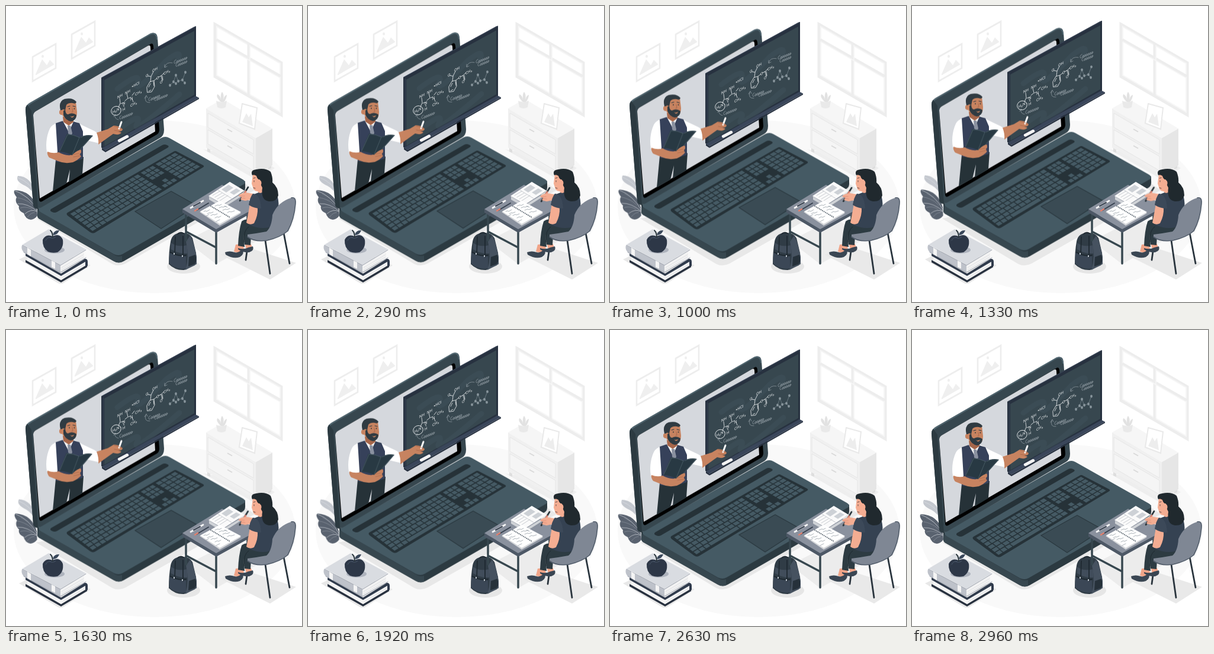
Write an HTML page that moves like this. It is 500 px wide and 500 px high and loops after 3000 ms.

```html
<!DOCTYPE html>
<html lang="en">
<head>
<meta charset="utf-8">
<title>Online chemistry lesson</title>
<style>
html,body{margin:0;width:100%;height:100%;overflow:hidden;background:#fff}
svg{display:block;width:100vw;height:100vh}
.line{fill:none;stroke-linecap:round;stroke-linejoin:round}
.float{animation:float 3s ease-in-out infinite}
.board{animation:lift 3s ease-in-out infinite}
.book{transform-origin:110px 250px;animation:tilt 3s ease-in-out infinite}
.leaf{transform-origin:50px 340px;animation:sway 3s ease-in-out infinite}
.write{animation:write .75s ease-in-out infinite}
@keyframes float{50%{transform:translateY(-8.6px)}}
@keyframes lift{50%{transform:translateY(-.8px)}}
@keyframes tilt{50%{transform:rotate(-2deg)}}
@keyframes sway{50%{transform:rotate(2deg)}}
@keyframes write{50%{transform:translate(-1px,1.2px)}}
#formula text{font:6.4px Inter,"Liberation Sans",sans-serif;fill:#f2f4f5}
</style>
</head>
<body>
<svg viewBox="0 0 500 500">
<ellipse cx="251" cy="339" rx="238" ry="146" fill="#f9f9f9"/>

<!-- wall pictures and window -->
<g id="picture">
  <path d="M45 86 84 64V105L45 127Z" fill="#fff" stroke="#ededed" stroke-width="2.600"/>
  <path d="M50 115 61 90 69 100 74 91 81 98V99L50 117Z" fill="#efefef"/>
  <ellipse cx="62" cy="85" rx="2" ry="2.500" fill="#efefef"/>
</g>
<use href="#picture" x="66" y="-38"/>
<g fill="none">
  <path d="M353 31 465 96V184L353 119Z" stroke="#ededed" stroke-width="5"/>
  <path d="M356 35 463 97V179L356 117Z" stroke="#f6f6f6" stroke-width="2"/>
  <path d="M410 64V150M355 57 464 119" stroke="#ededed" stroke-width="5"/>
  <path d="M412 66V149M356 60 464 122" stroke="#f6f6f6" stroke-width="1.500"/>
</g>

<!-- cabinet -->
<path d="M333 242 422 293 454 274 440 264Z" fill="#eee"/>
<path d="M340 238v8l5 2v-9M418 283v7l6 0v-8M443 270v6l5-2v-6" fill="#dedede"/>
<path d="M338 173 422 223V286L338 239Z" fill="#f0f0f0"/>
<path d="M422 223 450 207V269L422 286Z" fill="#e6e6e6"/>
<path d="M338 173 366 157 450 207 422 223Z" fill="#f6f6f6"/>
<path d="M341 181 418 226V250L341 205ZM341 209 418 254V278L341 233Z" fill="#f5f5f5" stroke="#e6e6e6"/>
<path d="M374 208l8 4.500M374 236l8 4.500" stroke="#d9d9d9" stroke-width="2"/>
<path d="M399 165 424 172 420 208 394 198Z" fill="#fff" stroke="#e9e9e9" stroke-width="2"/>
<path d="M399 196 406 181 410 188 414 182 417 203Z" fill="#ededed"/>
<path d="M363 162Q354 154 357 149Q362 151 363 158Q362 148 365 145Q369 150 367 158Q369 151 373 150Q373 157 367 163" fill="#e2e2e2"/>
<path d="M355 160Q364 165 373 160L371 171Q364 175 357 171Z" fill="#e9e9e9"/>

<!-- floor shadows -->
<path d="M51 359 180 436Q190 441 202 435L420 311 390 290Z" fill="#e8e8e8"/>
<path d="M22 428 70 405 143 438 97 468Q92 471 86 467Z" fill="#e8e8e8"/>
<ellipse cx="300" cy="440" rx="28" ry="12" fill="#e6e6e6"/>
<path d="M304 397 355 436 432 392 380 358Z" fill="#ececec"/>
<path d="M362 420 400 405 490 434 446 462Z" fill="#e9e9e9"/>

<!-- leaves -->
<g class="leaf">
  <path d="M53 320Q42 287 20 287Q15 296 33 304Q43 309 53 326Z" fill="#c3c7ce"/>
  <path d="M52 340Q43 312 15 311Q11 314 18 323Q14 331 22 338Q20 346 30 350Q33 360 42 361Q49 360 53 354Z" fill="#59626f"/>
  <path class="line" d="M20 290Q40 297 52 319M15 312Q39 320 53 345M20 334Q36 333 52 346M32 351Q42 342 52 347" stroke="#dfe3e8" stroke-width=".6"/>
  <path class="line" d="M20 324Q36 327 45 337M25 341Q35 338 45 344M37 356Q42 349 49 349M25 318Q36 323 43 331" stroke="#c7ccd4" stroke-width=".8" stroke-dasharray=".1 2"/>
</g>

<!-- laptop -->
<g class="float">
  <path d="M53 342V354Q53 358 57 360L182 431Q190 436 199 431L400 315Q405 312 404 303V296Z" fill="#2c3a41"/>
  <path d="M53 345 186 422Q191 424 196 422V432Q190 435 182 431L57 360Q53 358 53 354Z" fill="#37474f"/>
  <path d="M58 340 262 223Q269 219 276 223L400 293Q408 298 400 302L197 419Q190 423 182 419L58 348Q52 344 58 340Z" fill="#455a64"/>
  <path d="M76 343 264 235Q268 233 272 235L274 236Q276 238 272 240L86 348Q82 350 78 348Q73 346 76 343Z" fill="#263238"/>
  <path d="M104 349 283 246Q286 244 289 246L333 269Q336 271 332 273L150 383Q146 385 142 382L104 354Q101 351 104 349Z" fill="#263238"/>
  <g id="keys" fill="#455a64"/>
  <path d="M218 347 279 313 322 337 262 376Z" fill="#3a4b54" stroke="#2b3940" stroke-width="1.300"/>

  <path d="M33 176Q32 168 41 163L243 47Q255 42 256 54L267 209Q267 219 260 223L60 340Q48 346 46 336Z" fill="#37474f"/>
  <path class="line" d="M34 174Q34 168 42 164L243 48Q254 43 255 56" stroke="#526872" stroke-width="2"/>
  <path d="M33 176Q33 170 36 167L43 177 54 343Q46 342 46 336Z" fill="#2c3a41"/>
  <path d="M46 185Q46 181 50 178L243 65Q248 61 249 68L259 209Q259 214 255 217L61 330Q57 332 56 328Z" fill="#000"/>
  <path d="M46 185Q46 181 50 178L240 67Q244 65 244 70L252 212 57 325Z" fill="#d5d8dd"/>

  <!-- blackboard -->
  <g class="board">
    <path d="M161 121 318 35 321 34V156L166 243 161 239Z" fill="#27313f"/>
    <path d="M166 125 318 42V150L166 237Z" fill="#37474f"/>
    <path class="line" d="M162 121 320 35M164 124V237" stroke="#3b475a"/>
    <path class="line" d="M188 140Q230 108 222 130T270 93Q300 70 290 91M194 206Q232 177 221 199T293 149" stroke="#42545c" stroke-width="9" opacity=".4"/>
    <path d="M162 240 320 152 326 155 168 244Z" fill="#3a465a"/>
    <path d="M168 244 326 155V157L168 247 162 243V240Z" fill="#273140"/>
    <path d="M189 226 204 218Q208 218 207 222L192 230Q188 230 189 226Z" fill="#f4f4f4"/>
    <g id="formula">
      <g class="line" stroke="#f2f4f5" stroke-width=".8">
        <ellipse cx="186" cy="177" rx="8.500" ry="7.500" transform="rotate(-25 186 177)"/>
        <path d="M190 171 193 164 192 156M194 165 199 163M201 160 206 156 204 148M207 156 211 154M213 151 217 146M213 157 215 162M199 167V170"/>
        <path d="M238 137 243 128 250 126 251 136 246 145 239 146ZM241 137 244 131M249 128 250 135M245 142 241 144M244 128 245 119M244 119 239 118M245 119 249 111M250 126 255 122M258 120 262 118 267 113M262 118 264 126M264 118 265 125"/>
      </g>
      <g id="notes" class="line" stroke="#a4afb5" stroke-width=".6">
        <path d="M190 192Q183 191 184 184M182 187 184 183 187 185M243 163Q233 164 236 153M234 156 237 151 239 155M268 103Q271 94 281 96M268 99 268 104 272 102"/>
      </g>
      <path class="line" d="M277 134 283 128 287 117 291 127 298 125 303 112M298 125 302 130M283 128 287 131" stroke="#7d8b92" stroke-width=".7"/>
      <g id="atoms" fill="#87949b"/>
    </g>
  </g>

  <!-- teacher -->
  <path d="M84 260 131 255 129 284 106 298 108 276 102 300 79 313Z" fill="#263238"/>
  <path d="M83 199 99 193 116 194 130 202 149 211Q159 215 158 232L132 226 128 255 86 252 69 247Q66 229 72 212Q75 202 83 199Z" fill="#fff"/>
  <path d="M84 198 96 194 106 212 114 195 124 198 130 212V258Q108 266 84 263L87 246Z" fill="#36415a"/>
  <path d="M96 194 106 213 114 195 107 197Z" fill="#f4f4f4"/>
  <path d="M104 202 109 202 112 215 109 222 105 215Z" fill="#8a91a0"/>
  <path d="M96 187 113 188 114 196 106 202 97 196Z" fill="#a6664a"/>
  <path d="M94 166Q101 158 118 162L120 179Q120 193 109 194Q98 191 95 184Q89 184 90 178Q91 174 95 176Z" fill="#c78360"/>
  <path d="M92 176Q88 161 99 157Q113 154 119 162Q118 166 113 164Q106 163 102 167L100 176Q97 173 94 176Z" fill="#303b42"/>
  <path d="M97 177 100 175Q101 184 105 183Q112 179 119 184Q119 193 110 195Q100 193 97 184Z" fill="#303b42"/>
  <path class="line" d="M104 170l4-1M113 169l4 1" stroke="#303b42" stroke-width="1.100"/>
  <path class="line" d="M112 173l1 6-2 0" stroke="#a6664a" stroke-width=".9"/>
  <g fill="#263238"><circle cx="107" cy="173.500" r=".9"/><circle cx="115.500" cy="173.500" r=".9"/></g>
  <path d="M108 186q3 1.500 7-.5-1 3-4 3Z" fill="#c78360"/>
  <path d="M70 246Q80 250 89 247Q99 253 109 252Q115 245 126 242Q129 247 124 251L127 254Q122 260 113 264Q99 267 88 262L73 256Q69 251 70 246Z" fill="#c78360"/>
  <g class="book">
    <path d="M90 246 103 216Q114 217 124 222Q136 216 147 219L119 250 113 253Q104 247 90 246Z" fill="#283943"/>
    <path class="line" d="M91 245 104 217Q114 217 124 222M124 222 112 251M126 222Q137 217 145 220L119 249" stroke="#536770" stroke-width=".7"/>
    <path d="M110 254Q116 246 125 243Q128 246 123 249L126 252 119 258Z" fill="#c78360"/>
    <path class="line" d="M113 251 123 249M114 255 125 253" stroke="#a6664a" stroke-width=".7"/>
  </g>
  <path d="M153 214 172 208 182 202Q191 202 197 208Q197 212 190 212L195 214Q191 219 181 216L156 234Q157 224 153 214Z" fill="#c78360"/>
  <path class="line" d="M191 207 195 196" stroke="#fff" stroke-width="3"/>
  <path class="line" d="M182 203 190 205 196 208M183 210 193 212" stroke="#a6664a" stroke-width=".8"/>
</g>

<!-- books and apple -->
<g>
  <path d="M33 429 93 463 137 437V441L93 467 33 433Z" fill="#28313f"/>
  <path d="M36 422 93 454 134 430V438L93 463 36 430Z" fill="#f3f3f3"/>
  <path d="M33 418 93 452 133 427Q138 427 138 432V439L134 440V432L93 456 33 422Z" fill="#303b4c"/>
  <path d="M92 438 132 415V425L92 449Z" fill="#f3f3f3"/>
  <path class="line" d="M94 442 131 420M94 446 131 424M95 459 132 437" stroke="#d6d9dd" stroke-width=".7"/>
  <path d="M27 404 92 438V450L30 416Q25 411 27 404Z" fill="#bec2ca"/>
  <path d="M28 403 72 377 135 411 92 437Z" fill="#d9dce1"/>
  <path class="line" d="M28 404 92 438 135 412M30 416 92 450 135 425" stroke="#9ca2ad"/>
  <path d="M36 408l6 4v11l-6-4ZM77 430l6 3v11l-6-3Z" fill="#f4f4f4"/>
  <ellipse cx="82" cy="412" rx="17" ry="6" fill="#aeb3bd"/>
  <path d="M79 389Q91 383 96 395Q98 409 87 416Q78 418 71 415Q61 408 62 395Q67 384 79 389Z" fill="#2d3747"/>
  <path class="line" d="M79 391Q79 383 75 379" stroke="#263238" stroke-width="1.800"/>
  <path d="M79 387Q81 378 90 379Q87 387 79 387Z" fill="#39475a"/>
  <path class="line" d="M67 396Q70 390 75 391M74 391Q79 394 84 390" stroke="#526073" stroke-width=".8"/>
</g>

<!-- backpack -->
<g>
  <path d="M278 398Q280 385 294 383Q310 382 315 392L321 417Q323 433 319 438L301 446Q286 447 275 436Q275 414 278 398Z" fill="#303c46"/>
  <path d="M311 388Q316 395 322 424V436L303 446Q310 423 304 398Z" fill="#465260"/>
  <path d="M279 400Q289 408 306 404V418Q291 419 279 411Z" fill="#414d5b"/>
  <path d="M276 417Q289 424 304 423V443Q288 446 276 435Z" fill="#3b4756"/>
  <path d="M309 424 320 420Q323 431 319 436L308 440Z" fill="#26313a"/>
  <path class="line" d="M286 390 285 420M299 389 299 424M278 416Q290 423 304 421M290 385Q294 381 300 384" stroke="#1f2931" stroke-width="1.800"/>
  <path d="M283 417h2v3h-2ZM297 421h2v3h-2Z" fill="#bbc3cb"/>
</g>

<!-- chair legs -->
<path class="line" d="M410 393 405 429M438 396 446 452M469 383 479 435" stroke="#29343d" stroke-width="2.800"/>

<!-- desk -->
<g>
  <path class="line" d="M304 352V396M355 380V435M408 350V390M304 381 355 408" stroke="#37474f" stroke-width="3.500"/>
  <path d="M298 343 355 376 418 342V348L355 383 298 349Z" fill="#4d5866"/>
  <path d="M298 343 365 302 420 334V342L355 377Z" fill="#8a919e"/>
  <path d="M343 322 367 336 403 314V318L367 341 343 327Z" fill="#d0d3d7"/>
  <path d="M342 321 378 297 403 312 367 335Z" fill="#fafafa"/>
  <path d="M364 310l12-8 8 5-12 8ZM378 315l11-7 7 4-11 7Z" fill="#cdd1d6"/>
  <path class="line" d="M349 320l12-7M353 323l12-7M357 326l12-7M361 329l14-9M358 311 381 325" stroke="#b3b8bf" stroke-width=".7"/>
  <path d="M327 348 361 330 397 350 361 371Z" fill="#d5d7da"/>
  <path d="M328 347 361 329 397 348 361 368Z" fill="#fff"/>
  <path class="line" d="M346 338 378 357" stroke="#6a747d" stroke-width="2" stroke-dasharray=".2 2.800"/>
  <path class="line" d="M334 347l3-1 2 1 5-3M340 351l4-2 1 1 5-2M346 354l4-2 2 1 5-2M353 358l4-2 2 1 4-2M353 338l5-2 2 1 4-2M360 341l5-2 1 1 6-2M366 345l5-2 2 1 5-2M374 349l4-2 2 1 6-2M338 355l5-3M355 364l6-3M369 338l5 2" stroke="#75808a" stroke-width=".6"/>
  <path class="line" d="M312 341 333 329" stroke="#f7f7f7" stroke-width="2.800"/>
  <path class="line" d="M317 338 328 332M322 345 342 333" stroke="#37414f" stroke-width="2"/>
  <path class="line" d="M319 346 324 343" stroke="#e2806e" stroke-width="2.400"/>
</g>

<!-- student -->
<g>
  <path d="M388 403 400 402 402 411 397 418 385 415ZM403 400 414 402 416 409 406 411Z" fill="#f0a488"/>
  <path d="M370 416Q378 413 386 416Q392 418 399 411Q404 419 395 424Q384 428 371 420ZM392 409Q402 412 409 408L417 406Q420 413 411 416Q400 417 392 411Z" fill="#3a4653"/>
  <path d="M458 365Q455 382 437 387L414 388 413 404 403 403 401 385 403 407 392 405Q393 379 398 364Q406 356 421 366Z" fill="#2d3b42"/>
  <path class="line" d="M410 373Q401 378 402 399" stroke="#1f2a30"/>
  <path d="M417 319Q438 308 457 317Q465 336 455 370Q435 380 411 370L414 343Z" fill="#354252"/>
  <g class="write">
    <path class="line" d="M409 306 395 329" stroke="#263238" stroke-width="2.600"/>
    <path class="line" d="M405 313 402 318" stroke="#e2806e" stroke-width="2.600"/>
    <path d="M417 317 405 315Q394 317 393 321L398 323 396 327 404 329 418 326Z" fill="#f4ad92"/>
    <path class="line" d="M394 321 403 321M397 324 404 325" stroke="#d98973" stroke-width=".7"/>
  </g>
  <path d="M412 334Q419 332 425 340Q426 354 419 367Q412 371 406 366Q409 352 412 334Z" fill="#f4ad92"/>
  <path d="M417 317Q430 318 431 342Q419 342 410 336Q412 323 417 317Z" fill="#3c4959"/>
  <path d="M417 284Q424 280 437 287L436 313Q428 319 425 313Q418 313 417 306L415 300Z" fill="#f4ad92"/>
  <path d="M416 286Q412 277 423 276Q438 273 447 280Q451 290 450 298Q460 306 460 320Q457 331 444 330Q430 328 433 307Q428 298 429 293Q425 294 423 287Q419 284 416 286Z" fill="#20292e"/>
  <ellipse cx="428" cy="299" rx="3.500" ry="5" fill="#f4ad92"/>
  <path class="line" d="M418 291l3-1M419 295v2M418 307l3 1" stroke="#50403f" stroke-width=".9"/>
  <path d="M408 386Q424 384 440 381Q449 373 450 353Q459 331 482 324Q490 322 489 334Q487 360 476 380Q463 391 441 396Q420 399 408 390Z" fill="#7f8794"/>
  <path class="line" d="M482 324Q490 322 489 334Q487 360 476 380Q463 391 441 396Q420 399 408 390" stroke="#525d6b" stroke-width="1.600"/>
</g>
</svg>
<script>
const NS = 'http://www.w3.org/2000/svg';
const add = (parent, tag, attrs, text = '') => {
  const el = document.createElementNS(NS, tag);
  for (const k in attrs) el.setAttribute(k, attrs[k]);
  el.textContent = text;
  document.getElementById(parent).append(el);
};

// Position on the keyboard plane: u along a row, v from back to front.
const mix = (a, b, t) => a + (b - a) * t;
const plane = (u, v) => [
  mix(mix(107, 286, u), mix(146, 330, u), v),
  mix(mix(351, 247, u), mix(381, 271, u), v)
].map(n => n.toFixed(1)).join(' ');
const key = (u, v, w, h) => add('keys', 'path', {
  d: `M${plane(u, v)} ${plane(u + w, v)} ${plane(u + w, v + h)} ${plane(u, v + h)}Z`
});
const row = (r, from, to, count) => {
  const step = (to - from) / count;
  for (let i = 0; i < count; i++) key(from + i * step, r / 6 + .015, step - .007, .132);
};
for (let r = 0; r < 5; r++) row(r, .005, .65, 14 - (r > 2));
row(5, .005, .14, 3);
key(.14, .848, .26, .132);
row(5, .407, .65, 5);
for (let r = 0; r < 3; r++) row(r, .67, .79, 3);
row(4, .71, .75, 1);
row(5, .67, .79, 3);
for (let r = 0; r < 6; r++) row(r, .81, 1, 4);

const label = (x, y, s) =>
  add('formula', 'text', {transform: `translate(${x} ${y}) skewY(-29) scale(.92 1)`}, s);
[[188, 157, 'NH'], [201, 150, 'NH'], [212, 139, '•HCl'], [218, 152, 'CH₃'],
 [210, 160, 'N'], [180, 182, 'H₂N'], [197, 168, 'N'], [197, 178, 'H'], [210, 171, 'CH₃'],
 [236, 121, 'O'], [247, 112, 'OH'], [254, 125, 'O'], [266, 117, 'CH₃'], [260, 132, 'O']
].forEach(a => label(...a));

// Handwriting: a tall first letter, then small loops climbing along the board.
const scribble = (x, y, loops) => add('notes', 'path', {
  d: `M${x + 3} ${y - 6}c-3 0-4 6-2 6s2-2 3-3` + 'c2-3 3-2 1 1s1 1 2-2.200'.repeat(loops)
});
[[192, 191, 6], [241, 160, 5], [251, 160, 6], [284, 97, 6], [287, 102, 5]]
  .forEach(a => scribble(...a));

[[277, 134], [283, 128], [287, 117], [291, 127], [298, 125], [303, 112], [302, 130], [287, 131]]
  .forEach(([cx, cy]) => add('atoms', 'ellipse', {cx, cy, rx: 1.9, ry: 2.4}));
</script>
</body>
</html>
```
